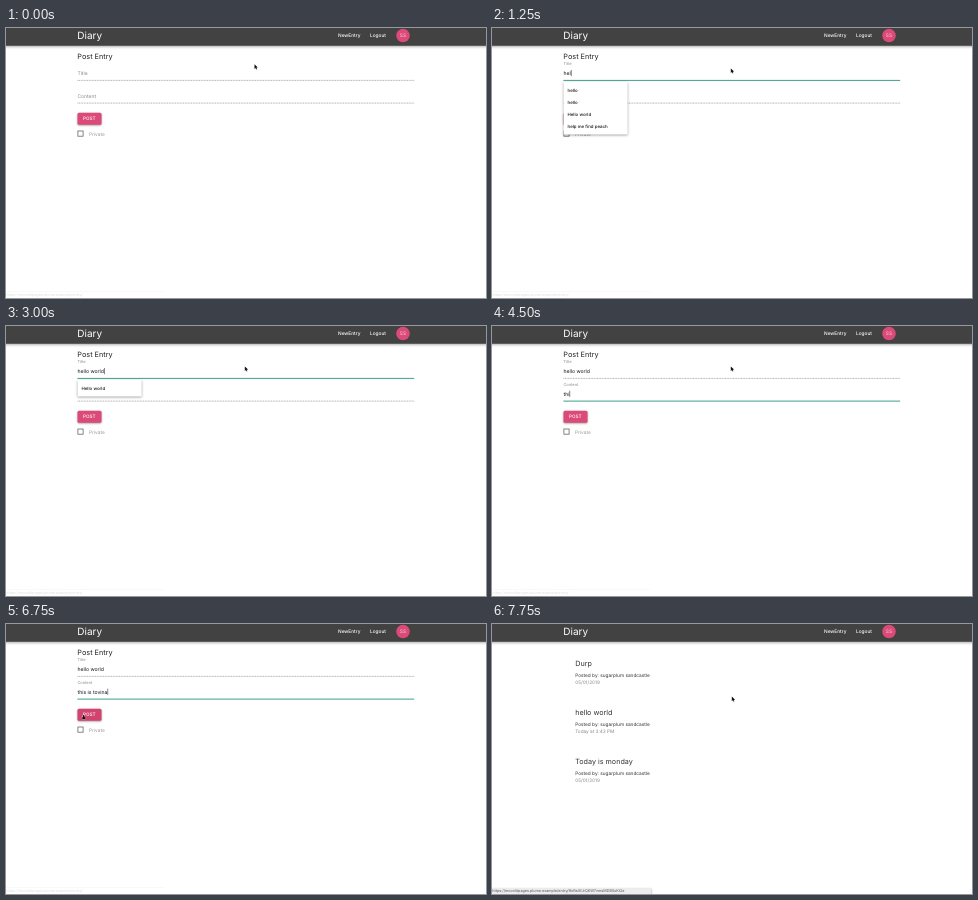
Recreate the animation shown at these times as an HTML page with a canvas. Size 480x270 px, loop 8 s.

```html
<!DOCTYPE html>
<html lang="en">
<head>
<meta charset="utf-8">
<title>Diary</title>
<style>
html, body { margin: 0; width: 100%; height: 100%; overflow: hidden; background: #fff; }
canvas { display: block; width: 480px; height: 270px; }
</style>
</head>
<body>
<canvas id="stage" width="480" height="270"></canvas>
<script>
const ctx = document.getElementById("stage").getContext("2d");
const LOOP = 8000, STEP = 250;
const PINK = "#db4a78", TEAL = "#3fa08c";

// Each track is a list of [start time, value]; values hold until the next start.
const titleTrack = [[0, ""], [750, "h"], [1000, "he"], [1250, "hel"], [1500, "hell"], [2000, "hello"],
  [2250, "hello "], [2500, "hello w"], [2750, "hello wor"], [3000, "hello world"]];
const contentTrack = [[0, ""], [4000, "t"], [4250, "th"], [4500, "thi"], [4750, "this"], [5000, "this "],
  [5250, "this i"], [5500, "this is"], [5750, "this is t"], [6000, "this is tov"], [6250, "this is tovina"]];
const focusTrack = [[0, ""], [500, "title"], [3500, "content"]];
const cursorTrack = [[0, [248.5, 36.3]], [250, [238.8, 40.4]], [6250, [135, 73]], [6500, [84, 88]],
  [6750, [77, 91]], [7250, [79, 91]], [7750, [239.8, 72.6]]];
const suggestions = ["hello", "hello ", "Hello world", "help me find peach", "hi there", "how are you"];
const entries = [["Durp", "05/01/2019"], ["hello world", "Today at 3:43 PM"], ["Today is monday", "05/01/2019"]];
const scheme = "https:";
const entryLink = id => `${scheme}//moonlitpages.plume.example/entry/${id}`;

const at = (track, t) => track.findLast(([start]) => start <= t)[1];

function text(str, x, y, size, color = "#222", weight = 400) {
  ctx.font = `${weight} ${size}px Inter, sans-serif`;
  ctx.fillStyle = color;
  ctx.fillText(str, x, y);
  return x + ctx.measureText(str).width;
}

function rect(x, y, w, h, color) {
  ctx.fillStyle = color;
  ctx.fillRect(x, y, w, h);
}

function raised(x, y, w, h, radius, color, blur) {
  ctx.save();
  ctx.shadowColor = "rgba(0,0,0,.4)";
  ctx.shadowBlur = blur;
  ctx.shadowOffsetY = 0.8;
  ctx.fillStyle = color;
  ctx.beginPath();
  ctx.roundRect(x, y, w, h, radius);
  ctx.fill();
  ctx.restore();
}

function header() {
  raised(-5, -5, 490, 22.7, 0, "#424242", 3);
  text("Diary", 71.3, 11.2, 10, "#fff");
  text("NewEntry", 332, 9.4, 4.8, "#fff", 500);
  text("Logout", 364, 9.4, 4.8, "#fff", 500);
  ctx.fillStyle = PINK;
  ctx.beginPath();
  ctx.arc(397, 7.5, 6.8, 0, 7);
  ctx.fill();
  text("SS", 393.8, 9.3, 4.8, "#f6d5e0");
}

function field(label, value, y, focused) {
  const raisedLabel = focused || value;
  text(label, 71.4, raisedLabel ? y - 9.8 : y, raisedLabel ? 4 : 5, "#8a8a8a");
  const end = text(value, 71.5, y - 0.1, 5.1, "#111");
  if (focused) {
    rect(end + 0.2, y - 5, 0.5, 6.2, "#111");
    rect(71.4, y + 4.9, 336.8, 1, TEAL);
  } else {
    ctx.strokeStyle = "#a0a0a0";
    ctx.lineWidth = 0.8;
    ctx.setLineDash([1, 0.6]);
    ctx.beginPath();
    ctx.moveTo(71.4, y + 5.4);
    ctx.lineTo(408.2, y + 5.4);
    ctx.stroke();
    ctx.setLineDash([]);
  }
}

function dropdown(typed) {
  const hits = suggestions.filter(s => s.toLowerCase().startsWith(typed));
  raised(71.6, 54, 64, 4.5 + 12 * hits.length, 0.5, "#fff", 2.5);
  hits.forEach((s, i) => text(s, 75.5, 63.6 + 12 * i, 4.4, "#111", 500));
}

function form(t) {
  const title = at(titleTrack, t), focus = at(focusTrack, t);
  text("Post Entry", 71.3, 31, 7.3);
  field("Title", title, 47, focus === "title");
  field("Content", at(contentTrack, t), 69.7, focus === "content");
  raised(71.5, 84.7, 24, 12, 1.5, t >= 7000 ? "#e2688f" : t >= 6500 ? "#d24370" : PINK, 2);
  text("POST", 77, 92.4, 4.7, "#fff", 500);
  ctx.strokeStyle = "#666";
  ctx.lineWidth = 0.8;
  ctx.strokeRect(71.9, 103, 5.2, 5.2);
  text("Private", 83, 107.6, 4.8, "#999");
  if (focus === "title" && title) dropdown(title);
}

function list() {
  entries.forEach(([title, date], i) => {
    const y = 49 * i;
    text(title, 83.2, y + 42, 7.2, "#333");
    text("Posted by: sugarplum sandcastle", 83.2, y + 52.6, 4.75, "#333");
    text(date, 83.2, y + 59.8, 4.7, "#888");
  });
}

function statusBar(t) {
  if (t < 7250) {
    rect(0, 263.3, 158, 0.5, "#f3f3f3");
    text(entryLink("").slice(0, 41), 0.3, 268.2, 3.75, "#dedede");
  } else if (t >= 7500) {
    raised(-2, 264, 161.5, 8, 1, "#ececec", 1.5);
    text(entryLink(t < 7750 ? "3kTq9wZrUe5nHsYb2LmXc8Gd" : "8nRaXfJrQ6W7vmsMDB5uKt2e"), 0.3, 268.4, 3.75, "#555");
  }
}

function cursor(t) {
  const [x, y] = at(cursorTrack, t), hand = t >= 6750 && t < 7750;
  ctx.save();
  ctx.translate(x, y);
  ctx.beginPath();
  if (hand) {
    ctx.roundRect(0, 0, 1.1, 3, 0.5);
    ctx.roundRect(-0.7, 1.5, 3.2, 2.8, 0.9);
  } else {
    [[0, 0], [0, 4.6], [1.1, 3.6], [1.9, 5.2], [2.6, 4.9], [1.9, 3.3], [3.3, 3.2]].forEach(p => ctx.lineTo(...p));
    ctx.closePath();
  }
  ctx.strokeStyle = "rgba(255,255,255,.8)";
  ctx.lineWidth = 0.8;
  ctx.stroke();
  ctx.fillStyle = "#111";
  ctx.fill();
  ctx.restore();
}

function draw(now) {
  const t = Math.floor((now % LOOP) / STEP) * STEP;
  ctx.textRendering = "geometricPrecision";
  rect(0, 0, 480, 270, "#fff");
  header();
  if (t < 7250) form(t);
  else list();
  statusBar(t);
  cursor(t);
}

const start = performance.now();
function tick() {
  draw(performance.now() - start);
  requestAnimationFrame(tick);
}
tick();
</script>
</body>
</html>
```
